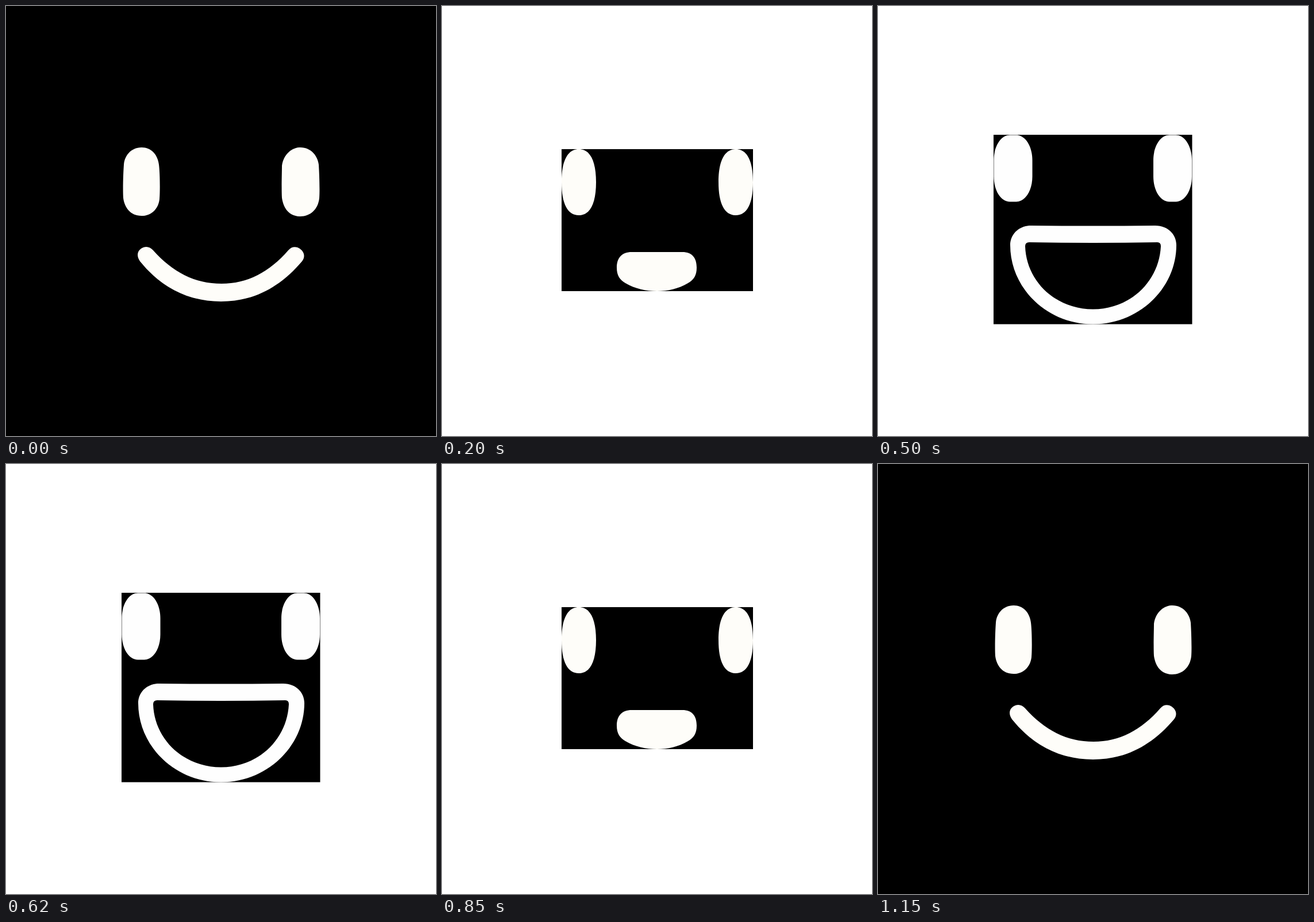
An HTML page for the animation above (1.25 s loop, 748x748 px).

```html
<!DOCTYPE html>
<html lang="en">
<head>
<meta charset="utf-8">
<title>Laughing face</title>
<style>
  html, body { margin: 0; width: 100%; height: 100%; overflow: hidden; background: #fff; }
  svg { display: block; width: 100%; height: 100%; }
</style>
</head>
<body>
<svg viewBox="0 0 748 748">
  <path id="plate"/>
  <path id="face" fill-rule="evenodd"/>
</svg>
<script>
const plate = document.getElementById('plate');
const face = document.getElementById('face');

// Rounded eye: horizontal extent, vertical extent, corner radii, corner fullness
function eye(left, right, top, bottom, rx, ry, k = 0.56) {
  const dx = rx * k, dy = ry * k;
  return `M${left + rx} ${top}H${right - rx}c${dx} 0 ${rx} ${ry - dy} ${rx} ${ry}` +
    `V${bottom - ry}c0 ${dy} ${dx - rx} ${ry} ${-rx} ${ry}` +
    `H${left + rx}c${-dx} 0 ${-rx} ${dy - ry} ${-rx} ${-ry}` +
    `V${top + ry}c0 ${-dy} ${rx - dx} ${-ry} ${rx} ${-ry}Z`;
}

const smile = {
  plate: 'M0 0H748V748H0Z',
  fill: '#fefdf9',
  face: `M236 246C254 246 264 260 266 276C268 292 268 325 267 336C265 354 252 365 236 365
    C216 365 206 350 204 334C203 318 204 290 205 276C206 260 218 246 236 246Z
    M512 246C530 246 542 260 544 276C545 292 546 320 545 334C543 354 529 366 512 366
    C494 366 483 354 480 334C479 318 480 290 480 278C482 260 496 246 512 246Z
    M256 425C290 463 328 483 375 483C420 483 458 463 491 425C497 418 505 418 511 422
    C519 428 521 436 515 444C476 490 430 514 374 514C318 514 270 490 233 444
    C227 435 228 427 235 422C242 417 250 418 256 425Z`
};

const small = {
  plate: 'M208 249H541V496H208Z',
  fill: '#fefdf9',
  face: eye(208, 268, 249, 364, 30, 57.5, 0.65) + eye(481, 541, 249, 364, 30, 57.5, 0.65) +
    `M330 428H418C435 428 443 438 443 455C443 469 438 476 428 482C411 492 393 496 374 496
    C355 496 336 492 319 482C309 476 304 469 304 455C304 438 313 428 330 428Z`
};

const grin = {
  plate: 'M196 229H552V518H196Z',
  fill: '#fefefa',
  face: eye(196.5, 268, 229.5, 348, 35.5, 40) + eye(480, 551.5, 229.5, 348, 35.5, 40) +
    `M268 385C340 405 408 405 481 385C503 379 518 395 518 417C518 472 454 518 374 518
    C294 518 230 472 230 419C230 394 247 379 268 385Z
    M257 415Q258 411 262 412C335 432 413 432 486 412Q490 411 491 416
    C491 454 438 490 374 490C310 490 258 454 257 415Z`
};

const laugh = {
  plate: 'M201 224H546.5V553.5H201Z',
  fill: '#fefefe',
  face: eye(201.5, 268.5, 224.5, 340.5, 28, 44) + eye(479, 546, 224.5, 340.5, 28, 44) +
    `M266 382Q374 383 482 382C504 382 519 397 519 416C519 490 455 553.5 374 553.5
    C293 553.5 230 490 230 416C230 397 245 382 266 382Z
    M263 411Q374 413 486 411Q492 411 492 418C489 479 439 527.5 374 527.5
    C309 527.5 258 479 256 418Q256 411 263 411Z`
};

const timeline = [
  [200, smile], [350, small], [500, grin], [700, laugh],
  [850, grin], [1000, small], [1250, smile]
];
let shown;

function draw() {
  const time = performance.now() % 1250;
  const pose = timeline.find(([end]) => time < end)[1];
  if (pose !== shown) {
    plate.setAttribute('d', pose.plate);
    face.setAttribute('d', pose.face);
    face.setAttribute('fill', pose.fill);
    shown = pose;
  }
  requestAnimationFrame(draw);
}
draw();
</script>
</body>
</html>
```
